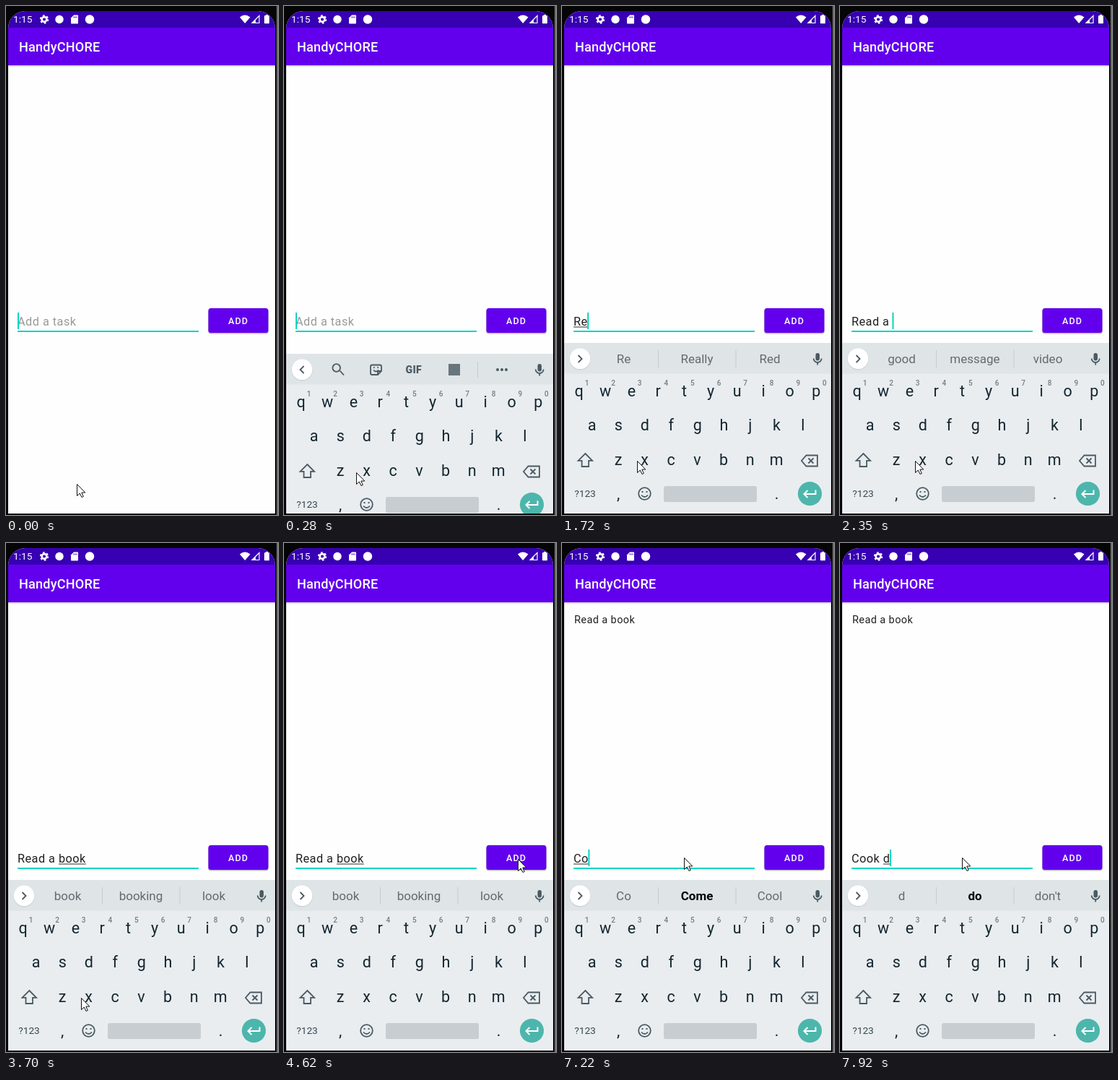
Write an HTML page that moves like this. It is 377 px wide and 704 px high and loops after 8 s.

```html
<!DOCTYPE html>
<html lang="en">
<head>
<meta charset="utf-8">
<title>Task list</title>
<style>
  html, body { margin: 0; width: 100%; height: 100%; overflow: hidden; background: #050505; }
  svg { display: block; width: 100%; height: 100%; }
  text { font-family: Roboto, sans-serif; white-space: pre; }
  .mid { text-anchor: middle; }
  .line { fill: none; stroke: #4a5a62; stroke-width: 1.8; }
  .key { font-size: 21.5px; fill: #14262f; }
  .digit { font-size: 10px; font-weight: 500; fill: #737d83; }
  .word { font-size: 17px; fill: #636b70; }
  .body { letter-spacing: .03em; fill: #202020; }
</style>
</head>
<body>
<svg viewBox="0 0 377 704">
  <defs>
    <clipPath id="screen"><path d="M3 702V31A24 24 0 0 1 27 7H349A24 24 0 0 1 373 31V702Z"/></clipPath>
    <linearGradient id="shade" x2="0" y2="1"><stop stop-color="#000" stop-opacity=".2"/><stop offset="1" stop-color="#000" stop-opacity="0"/></linearGradient>
  </defs>
  <rect width="377" height="704" fill="#050505"/>
  <path d="M376 0V704" stroke="#8c8c8c" stroke-width="1.5"/>
  <g clip-path="url(#screen)">
    <rect x="3" y="7" width="370" height="695" fill="#fefefe"/>
    <rect x="3" y="82" width="370" height="3" fill="url(#shade)"/>
    <rect x="3" y="30" width="370" height="52" fill="#6200ee"/>
    <rect x="3" y="7" width="370" height="23" fill="#3700b3"/>

    <g fill="#fff">
      <text x="10" y="23.3" font-size="13.7">1:15</text>
      <g fill="none" stroke="#fff">
        <circle cx="53" cy="18.5" r="3.4" stroke-width="2.6"/>
        <circle cx="53" cy="18.5" r="5.2" stroke-width="2" stroke-dasharray="2.7 2.745"/>
      </g>
      <circle cx="74" cy="18.5" r="5.7"/>
      <path d="M94 12.5h5q1 0 1 1v10q0 1-1 1h-8q-1 0-1-1V16.5Z"/>
      <path d="M94 14.5v2M96 14.5v2M98 14.5v2" stroke="#3700b3"/>
      <circle cx="116" cy="18.5" r="6.2"/>
      <path d="M324 15.5Q331 9.5 338.500 15.5L331.200 24Z"/>
      <path d="M341 23.500L351 13.500V23.500Z" fill="none" stroke="#fff" stroke-width="1.2"/>
      <path d="M346 18.500V24H341Z"/>
      <path d="M358 14q0-.7.7-.7H360V12h3v1.300h1.300q.7 0 .7.7v9.600q0 .7-.7.7h-5.600q-.7 0-.7-.7Z"/>
      <text x="18" y="63.300" font-size="18.100" font-weight="500" letter-spacing=".2">HandyCHORE</text>
    </g>

    <text id="item" class="body" x="17" y="111" font-size="14.44">Read a book</text>
    <text id="field" class="body" x="16" y="442" font-size="16.25"></text>
    <rect id="spell" y="443.500" height="1" fill="#303030"/>
    <rect x="16" y="449" width="251" height="2" fill="#03d5c1"/>
    <rect id="caret" y="424" width="2" height="23" fill="#03d5c1"/>
    <rect id="lift" x="280" y="419.500" width="84" height="34" rx="4" fill="#000" opacity=".25"/>
    <rect x="280.500" y="418" width="83" height="34" rx="3.500" fill="#6200ee"/>
    <rect id="ripple" x="280.500" y="418" width="83" height="34" rx="3.500" fill="#fff"/>
    <text x="308" y="440" font-size="12.6" font-weight="500" letter-spacing="1.12" fill="#fff">ADD</text>

    <g id="keyboard">
      <rect x="3" y="466" width="370" height="240" fill="#e9edf0"/>
      <rect x="3" y="466" width="370" height="42.500" fill="#dfe4e7"/>
      <circle cx="25" cy="488.600" r="14.800" fill="#cbd0d3"/>
      <circle cx="25" cy="487.800" r="14.300" fill="#fff"/>
      <path id="chevron" class="line"/>
      <g fill="#4a5a62">
        <rect x="351.500" y="480" width="5.500" height="10.500" rx="2.750"/>
        <path class="line" d="M348.700 487.500a5.500 5.500 0 0 0 11 0M354.200 493v3.500" stroke-width="1.600"/>
      </g>

      <g id="tools">
        <path class="line" d="M77.500 489.500L83 495.500"/><circle class="line" cx="72.700" cy="485.500" r="5.300"/>
        <path class="line" d="M122 481.500h11q2 0 2 2v6.500l-5 5h-8q-2 0-2-2v-9.500q0-2 2-2ZM135 490h-3q-2 0-2 2v3M124 488.500q3.500 4 7 0M124 485h1.500M129.500 485h1.500" stroke-width="1.600"/>
        <text x="168.500" y="493" font-size="14" font-weight="900" letter-spacing=".4" fill="#4a5a62">GIF</text>
        <rect x="228" y="480" width="16" height="16" fill="#68757c"/>
        <path d="M268.500 477V499" stroke="#c5cbcf"/>
        <path d="M296 488h.01M302 488h.01M308 488h.01" stroke="#4a5a62" stroke-width="4" stroke-linecap="round"/>
      </g>
      <g id="words">
        <path d="M133.500 476V500M241 476V500" stroke="#c5cbcf"/>
        <text class="word mid" x="85.500" y="494.300"></text>
        <text class="word mid" x="187" y="494.300"></text>
        <text class="word mid" x="288" y="494.300"></text>
      </g>

      <g id="keys"></g>
      <path id="shift" class="line" d="M32.300 619L42 628.800H37V637H27.500V628.800H22.500Z"/>
      <path class="line" d="M338.500 621.500H354V636.500H338.500L332 629ZM341.500 625.500l7 7M348.500 625.500l-7 7"/>
      <text class="mid" x="32" y="679.300" font-size="13.700" fill="#36474f">?123</text>
      <circle class="line" cx="114.500" cy="674.500" r="8.300"/>
      <path class="line" d="M110 676.500q4.500 5 9 0M110.500 672h2M116.500 672h2"/>
      <rect x="141" y="664" width="129" height="22" rx="2.500" fill="#c8cdd1"/>
      <circle cx="343.500" cy="674.500" r="16.600" fill="#4db6ac"/>
      <path d="M351.500 669.500V675H336M340.500 670L335.500 675L340.500 680" fill="none" stroke="#fff" stroke-width="2"/>
    </g>
    <path id="mouse" d="M.5 .5V16.500L4.300 13L7 18.500L9.300 17.500L6.800 12H11.800Z" fill="#fff" stroke="#111"/>
  </g>
</svg>
<script>
const LOOP = 8000;
const $ = id => document.getElementById(id);

// Every track is a list of [start time, ...values], held until the next entry.
const slide = [[0, 240], [280, 15], [430, 0]];
const pointer = [[0, 98, 661], [280, 100, 645], [430, 104, 629], [4350, 194, 485], [4490, 292, 450],
  [4620, 324, 437], [5290, 310, 453], [5430, 248, 459], [5560, 201, 459], [5700, 180, 450],
  [5830, 169, 439], [5980, 169, 435]];
const blink = [[0, 1], [430, 0], [960, 1], [3700, 0], [4080, 1], [4620, 0], [5050, 1],
  [5430, 0], [5980, 1], [6510, 0], [6940, 1]];
const press = [[0, 0], [5050, .25], [5170, .16], [5290, 0]];
const caps = [[0, 0], [1330, 1], [1570, 0]];
// A leading * marks the bold suggestion.
const typing = [
  [0, ''],
  [1450, 'R', 'R', 'Right', 'Re'],
  [1720, 'Re', 'Re', 'Really', 'Red'],
  [1840, 'Rea', 'Rea', '*Read', 'Really'],
  [1960, 'Read', 'Read', 'Ready', 'Reading'],
  [2080, 'Read ', 'the', 'it', 'and'],
  [2230, 'Read a', 'a', 'and', 'are'],
  [2350, 'Read a ', 'good', 'message', 'video'],
  [2750, 'Read a b', 'b', '*be', 'but'],
  [2870, 'Read a bo', 'bo', '*book', 'both'],
  [2990, 'Read a boo', 'boo', 'book', 'boot'],
  [3140, 'Read a book', 'book', 'booking', 'look'],
  [5170, ''],
  [6940, 'C', 'C', 'Can', 'Call'],
  [7220, 'Co', 'Co', '*Come', 'Cool'],
  [7370, 'Coo', 'Coo', '*Cool', 'Cook'],
  [7510, 'Cook', 'Cook', 'Cooking', 'Cooked'],
  [7770, 'Cook ', 'the', 'and', 'for'],
  [7920, 'Cook d', 'd', '*do', "don't"]
];

const at = (track, t) => track.findLast(step => step[0] <= t).slice(1);
const set = (el, attrs) => { for (const name in attrs) el.setAttribute(name, attrs[name]); };
const show = (id, on) => set($(id), { visibility: on ? 'visible' : 'hidden' });

function addKey(label, x, y, className) {
  const el = document.createElementNS('http://www.w3.org/2000/svg', 'text');
  set(el, { x, y, class: className + ' mid' });
  el.textContent = label;
  $('keys').append(el);
  return el;
}

const letters = [['qwertyuiop', 23.5, 540], ['asdfghjkl', 41.7, 587], ['zxcvbnm', 78, 635]]
  .flatMap(([row, x, y]) => [...row].map((c, i) => addKey(c, x + i * 36.52, y, 'key')));
[...'1234567890'].forEach((c, i) => addKey(c, 34.5 + i * 36.6, 525, 'digit'));
addKey(',', 78, 682, 'key');
addKey('.', 297.5, 682, 'key');

const field = $('field');
const wordEls = $('words').querySelectorAll('text');

function showTyping(text, words) {
  field.textContent = text || 'Add a task';
  field.style.fill = text ? '' : '#999';
  const widthOf = n => n ? field.getSubStringLength(0, n) : 0;
  const end = widthOf(text.length);
  const wordStart = widthOf(text.lastIndexOf(' ') + 1);
  set($('caret'), { x: 16 + Math.max(0, end - .5) });
  set($('spell'), { x: 16 + wordStart, width: Math.max(0, end - wordStart) });
  show('tools', !text);
  show('words', text);
  set($('chevron'), { d: text ? 'M22.500 483l5 5-5 5' : 'M27.500 483l-5 5 5 5' });
  wordEls.forEach((el, i) => {
    const word = words[i] || '';
    el.textContent = word.replace('*', '');
    el.style.cssText = word[0] === '*' ? 'font-weight:700;fill:#050505' : '';
  });
}

function draw(t) {
  const [text, ...words] = at(typing, t);
  showTyping(text, words);
  const [upper] = at(caps, t);
  letters.forEach(el => {
    el.textContent = upper ? el.textContent.toUpperCase() : el.textContent.toLowerCase();
  });
  $('shift').style.fill = upper ? '#4a5a62' : 'none';
  const [pressed] = at(press, t);
  set($('ripple'), { opacity: pressed });
  set($('lift'), { opacity: pressed ? .4 : .25 });
  show('item', t >= 5170);
  show('caret', at(blink, t)[0]);
  set($('keyboard'), { transform: `translate(0 ${at(slide, t)})` });
  set($('mouse'), { transform: `translate(${at(pointer, t)})` });
}

const start = performance.now();
function tick() {
  draw((performance.now() - start) % LOOP);
  requestAnimationFrame(tick);
}
tick();
</script>
</body>
</html>
```
